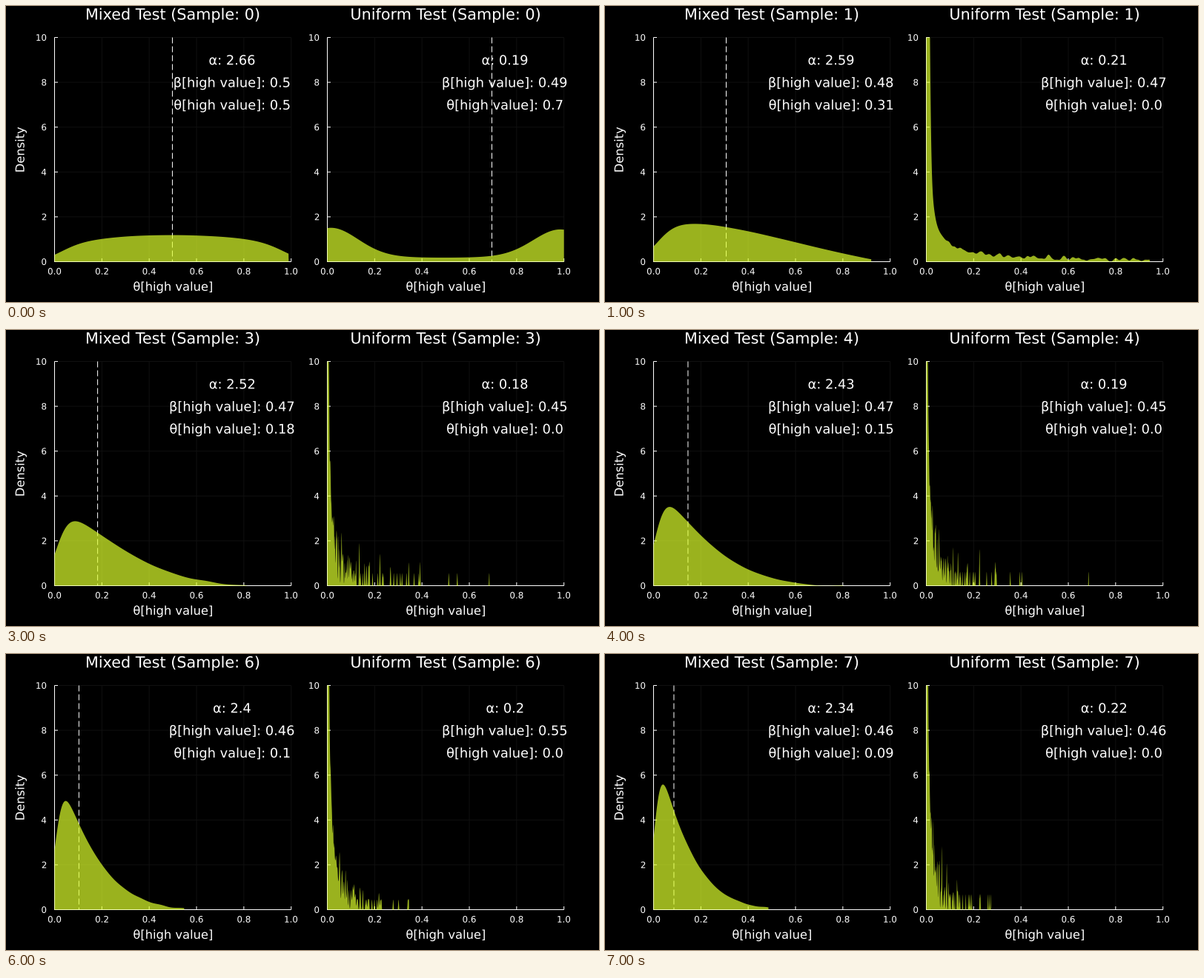
Write a matplotlib script that moves like this. It is 800x400 px and loops after 8 s.

```python
import matplotlib
import matplotlib.pyplot as plt
import numpy as np
from matplotlib.animation import FuncAnimation
from matplotlib.patches import PathPatch
from matplotlib.textpath import TextPath
from matplotlib.transforms import Affine2D

matplotlib.rcParams.update({"font.family": "DejaVu Sans", "toolbar": "None"})

W, H, DPI = 800, 400, 100
TOP, BOTTOM, SPAN = 42.5, 345.5, 319.2
PX = 72 / DPI
TICK, GUIDE, NOTE, TITLE = 11.87, 16.3, 17.8, 20.75
DRAWS = 600
X = np.linspace(0, 1, 2001)


def beta_draws(a, b, rng):
    """Jittered quantiles of a Beta(a, b), found on a logit scale."""
    z = np.linspace(-150, 150, 30001)
    cdf = np.cumsum(np.exp(-a * np.logaddexp(0, -z) - b * np.logaddexp(0, z)))
    u = (np.arange(DRAWS) + 4 * rng.random(DRAWS)) / (DRAWS + 3)
    return 1 / (1 + np.exp(-np.interp(u, cdf / cdf[-1], z)))


def density(draws):
    """Gaussian kernel estimate, cut off at the outermost draws."""
    q1, q3 = np.percentile(draws, [25, 75])
    width = .9 * min(draws.std(), (q3 - q1) / 1.34) * DRAWS ** -.2
    kernels = np.exp(-.5 * ((X[:, None] - draws) / width) ** 2)
    y = kernels.mean(axis=1) / (width * np.sqrt(2 * np.pi))
    return np.where(X <= draws.max() + .001, y, 0)


fig = plt.figure(figsize=(W / DPI, H / DPI), dpi=DPI, facecolor="black")
ax = fig.add_axes([0, 0, 1, 1])
ax.set(xlim=(0, W), ylim=(H, 0))
ax.axis("off")


def ypx(v):
    return BOTTOM - v * (BOTTOM - TOP) / 10


def line(xs, ys, color="white", z=2):
    return ax.plot(xs, ys, color=color, lw=PX, zorder=z, snap=False,
                   solid_capstyle="butt", dash_capstyle="butt")[0]


class Label:
    """Text as outlines, so that it can sit between whole pixels."""

    def __init__(self, x, y, size, s="0", align=.5, angle=0):
        self.x, self.y, self.size = x, y, size
        self.align, self.angle = align, angle
        self.patch = ax.add_patch(PathPatch(TextPath((0, 0), s), fc="white",
                                            lw=0, zorder=6))
        self.set(s)

    def set(self, s):
        path = TextPath((0, 0), s, size=self.size)
        box = path.get_extents()
        place = (Affine2D().translate(-box.x0 - self.align * box.width, 0)
                 .rotate_deg(self.angle).scale(1, -1)
                 .translate(self.x, self.y))
        self.patch.set_path(place.transform_path(path))


class Panel:
    def __init__(self, left, name, alpha, beta, theta):
        self.left, self.name = left, name
        self.values = list(zip(alpha, beta, theta))
        rng = np.random.default_rng(7)
        self.curves = [density(beta_draws(a * b, a * (1 - b) + n, rng))
                       for n, (a, b, _) in enumerate(self.values)]
        self.draw_axes()
        self.fill = ax.fill([left], [BOTTOM], color="#ddff2b", alpha=.7,
                            lw=0, zorder=4)[0]
        self.mark = line([left, left], [TOP, BOTTOM], z=3)
        self.mark.set_dashes([8, 4])
        self.title = Label(left + SPAN / 2, 18.35, TITLE)
        self.notes = [Label(left + .75 * SPAN, ypx(v) + 6.5, NOTE)
                      for v in (9, 8, 7)]

    def draw_axes(self):
        left, right = self.left, self.left + SPAN
        for i in range(6):
            x, y = left + SPAN * i / 5, ypx(2 * i)
            line([x, x], [TOP, BOTTOM], "#101010", 1)
            line([left, right], [y, y], "#101010", 1)
            line([x, x], [BOTTOM, BOTTOM - 4.5])
            line([left, left + 4.5], [y, y])
            Label(x, 362.7, TICK, f"{i / 5:.1f}")
            Label(left - 11.3, y + 4.4, TICK, str(2 * i), align=1)
        line([left, left], [TOP, BOTTOM + .5])
        line([left, right], [BOTTOM, BOTTOM])
        Label(left + SPAN / 2, 384.8, GUIDE, "θ[high value]")

    def show(self, n):
        y = ypx(np.minimum(self.curves[n], 10))
        x = self.left + SPAN * X
        self.fill.set_xy(np.column_stack([
            np.r_[x[0], x, x[-1]], np.r_[BOTTOM, y, BOTTOM]]))
        pos = self.left + SPAN * self.values[n][2]
        self.mark.set_xdata([pos, pos])
        self.title.set(f"{self.name} Test (Sample: {n})")
        names = ("α", "β[high value]", "θ[high value]")
        for note, key, value in zip(self.notes, names, self.values[n]):
            note.set(f"{key}: {round(value, 2)}")


panels = [
    Panel(65.5, "Mixed",
          alpha=[2.66, 2.59, 2.55, 2.52, 2.43, 2.46, 2.4, 2.34],
          beta=[.5, .48, .47, .47, .47, .46, .46, .46],
          theta=[.498, .307, .23, .182, .1455, .123, .103, .086]),
    Panel(433.5, "Uniform",
          alpha=[.19, .21, .2, .18, .19, .19, .2, .22],
          beta=[.49, .47, .47, .45, .45, .63, .55, .46],
          theta=[.6955, 0.0, 0.0, 0.0, 0.0, .0065, 0.0, 0.0]),
]
Label(24.6, 193.7, GUIDE, "Density", angle=90)


def update(n):
    for panel in panels:
        panel.show(n)
    return []


anim = FuncAnimation(fig, update, frames=8, interval=1000, repeat=True,
                     repeat_delay=0, blit=False)
plt.show()
```
